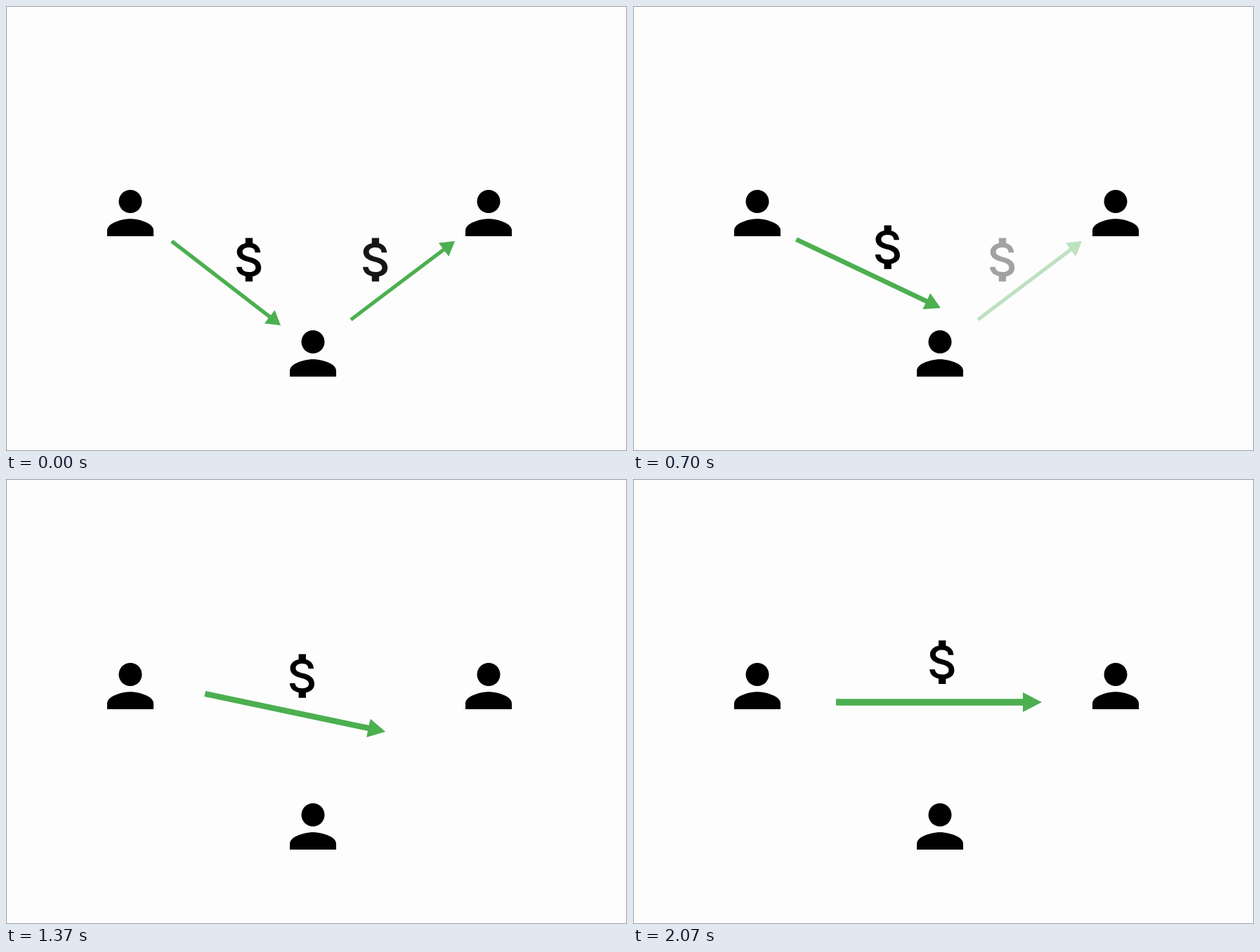
These frames come from a looping animation (884 by 634 pixels, 2.11 s). An HTML page:

```html
<!DOCTYPE html>
<html lang="en">
<head>
<meta charset="utf-8">
<title>Payment through a middleman becomes direct</title>
<style>
  html, body { margin: 0; width: 100%; height: 100%; overflow: hidden; background: #fdfdfd; }
  svg { display: block; }
</style>
</head>
<body>
<svg width="884" height="634" viewBox="0 0 884 634">
  <defs>
    <g id="person" transform="scale(4.125) translate(-12 -12)">
      <circle cx="12" cy="8" r="4"/>
      <path d="M12 14c-2.67 0-8 1.34-8 4v2h16v-2c0-2.66-5.33-4-8-4z"/>
    </g>
    <path id="dollar" transform="scale(3.45) translate(-11.4 -12)" d="M11.8 10.9c-2.27-.59-3-1.2-3-2.15 0-1.09 1.01-1.85 2.7-1.85 1.78 0 2.44.85 2.5 2.1h2.21c-.07-1.72-1.12-3.3-3.21-3.81V3h-3v2.16c-1.94.42-3.5 1.68-3.5 3.61 0 2.31 1.91 3.46 4.7 4.13 2.5.6 3 1.48 3 2.41 0 .69-.49 1.79-2.7 1.79-2.06 0-2.87-.92-2.98-2.1h-2.2c.12 2.19 1.76 3.42 3.68 3.83V21h3v-2.15c1.95-.37 3.5-1.5 3.5-3.55 0-2.84-2.43-3.81-4.7-4.4z"/>
  </defs>
  <rect x=".5" y=".5" width="883" height="633" fill="#fdfdfd" stroke="#9a9aa6"/>
  <use href="#person" x="177" y="295"/>
  <use href="#person" x="687" y="295"/>
  <use href="#person" x="437" y="495"/>
  <path id="outArrow" fill="#4caf50"/>
  <use id="outDollar" href="#dollar" x="525.6" y="361.5"/>
  <path id="arrow" fill="#4caf50"/>
  <use id="coin" href="#dollar"/>
</svg>
<script>
const LOOP = 2110;
const $ = id => document.getElementById(id);
const mix = (a, b, k) => a + (b - a) * k;
const clamp = (v, lo, hi) => Math.min(hi, Math.max(lo, v));

// Monotone cubic curve through [time, value] keys
function curve(keys) {
  const slopes = keys.slice(1).map(([t, v], i) => (v - keys[i][1]) / (t - keys[i][0]));
  const tangents = keys.map((_, i) => {
    const a = slopes[i - 1] ?? slopes[i], b = slopes[i] ?? a;
    return a * b > 0 ? 2 * a * b / (a + b) : 0;
  });
  return time => {
    const end = keys[keys.length - 1];
    if (time >= end[0]) return end[1];
    const i = keys.findIndex(k => k[0] > time) - 1;
    const [t0, v0] = keys[i], [t1, v1] = keys[i + 1];
    const d = t1 - t0, u = (time - t0) / d, w = 1 - u;
    return v0 * w * w * (1 + 2 * u) + v1 * u * u * (3 - 2 * u)
      + d * u * w * (tangents[i] * w - tangents[i + 1] * u);
  };
}

const travel = curve([[0, 0], [300, .012], [700, .177], [900, .362],
  [1200, .641], [1530, .918], [1800, .99], [2070, 1]]);
const turn = curve([[0, 0], [300, .122], [700, .325], [900, .432],
  [1200, .584], [1530, .775], [2070, 1]]);

// Arrow centred on x, y
function drawArrow(el, x, y, angle, length, stroke, headLength, headWidth) {
  const l = length / 2, s = stroke / 2, h = headWidth / 2, neck = l - headLength;
  el.setAttribute('d', `M${-l} ${-s}H${neck}V${-h}L${l} 0L${neck} ${h}V${s}H${-l}z`);
  el.setAttribute('transform', `translate(${x} ${y}) rotate(${angle})`);
}

function frame() {
  const t = performance.now() % LOOP;
  const p = travel(t), q = turn(t);
  drawArrow($('arrow'), mix(313.5, 435.5, p), mix(395, 318, p), mix(37.7, 0, q),
    mix(196, 293, q), mix(5.5, 9.5, q), mix(20, 27, q), mix(24, 28, q));
  $('coin').setAttribute('x', mix(345.6, 439.8, p));
  $('coin').setAttribute('y', mix(361.5, 261, p));
  const fade = clamp((1048 - t) / 973, 0, 1);
  $('outArrow').setAttribute('opacity', fade);
  $('outDollar').setAttribute('opacity', Math.min(.91, fade));
  requestAnimationFrame(frame);
}

drawArrow($('outArrow'), 565, 391, -37.1, 185.6, 5.2, 20, 24);
frame();
</script>
</body>
</html>
```
